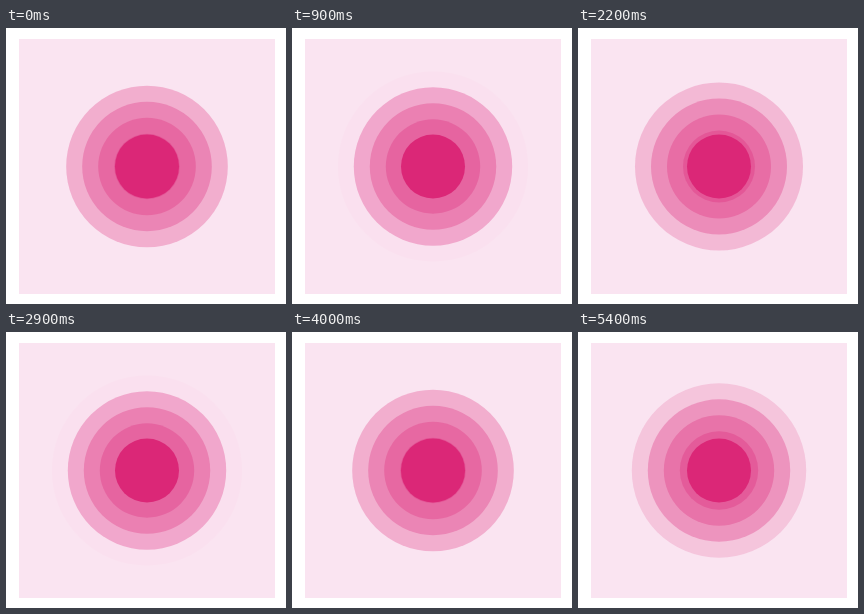
Animation of 280x276 px, one loop 5500 ms. Source, as an HTML page:

```html
<!DOCTYPE html>
<html lang="en">
<head>
<meta charset="utf-8">
<title>Ripple</title>
<style>
  html, body { margin: 0; width: 100%; height: 100%; overflow: hidden; background: #fff; }
  svg { display: block; width: 280px; height: 276px; }
</style>
</head>
<body>
<svg viewBox="0 0 280 276">
  <rect x="13" y="11" width="256" height="255" fill="#fae4f1"/>
  <g id="rings" fill="#db2777"></g>
  <circle cx="141" cy="138.5" r="32" fill="#db2777"/>
</svg>
<script>
  const LOOP = 5500, STEP = 100, PERIOD = 1000, LEAD = 50;
  const CORE = 32, GAP = 16, COUNT = 4, ALPHA = 0.3;

  const group = document.getElementById('rings');
  const rings = Array.from({ length: COUNT }, () => {
    const ring = document.createElementNS('http://www.w3.org/2000/svg', 'circle');
    ring.setAttribute('cx', 141);
    ring.setAttribute('cy', 138.5);
    return group.appendChild(ring);
  });

  // Each ring grows by one gap per period; the outermost fades away.
  function draw(ms) {
    const t = Math.floor((ms % LOOP) / STEP) * STEP;
    const phase = ((t + LEAD) % PERIOD) / PERIOD;
    rings.forEach((ring, i) => {
      ring.setAttribute('r', CORE + GAP * (i + phase));
      ring.setAttribute('fill-opacity', i === COUNT - 1 ? ALPHA * (1 - phase) : ALPHA);
    });
  }

  const start = performance.now();
  function tick() {
    draw(performance.now() - start);
    requestAnimationFrame(tick);
  }
  tick();
</script>
</body>
</html>
```
